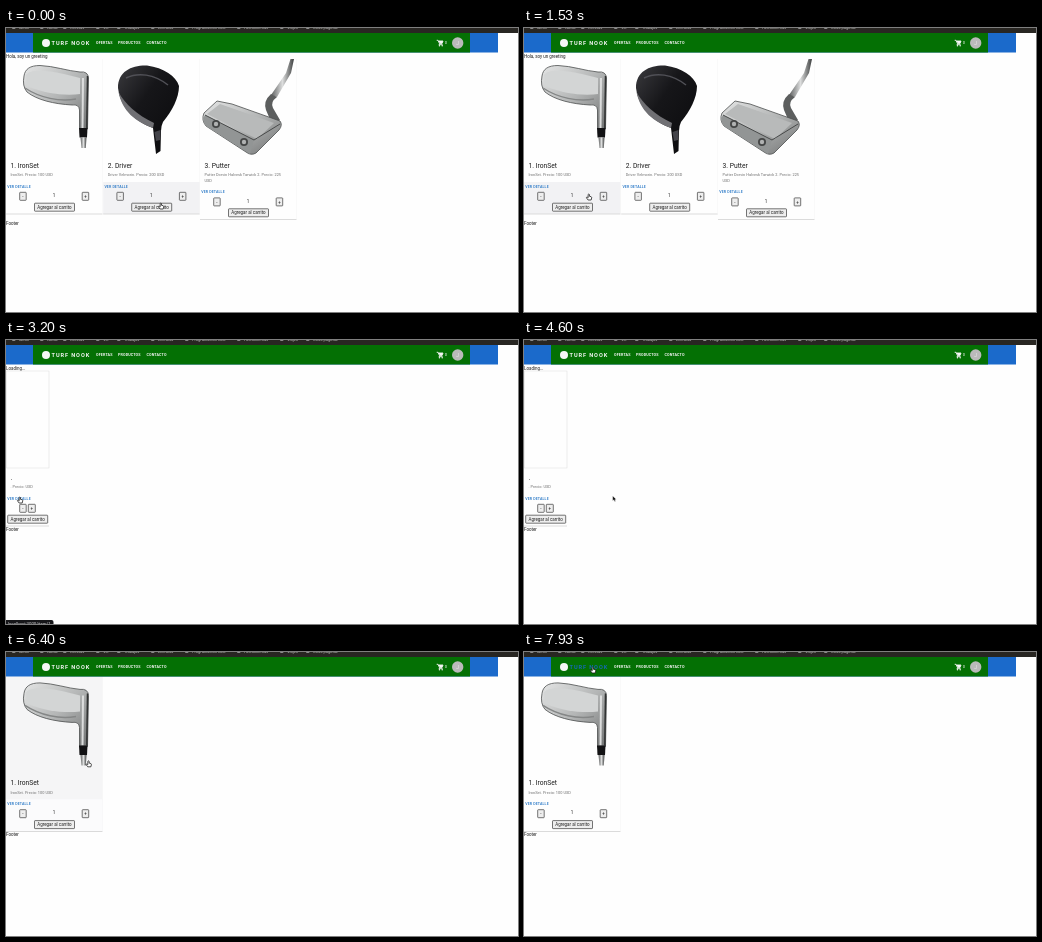
Recreate the animation shown at these times as an HTML page. Size 512 by 284 pixels, loop 8000 ms.

```html
<!DOCTYPE html>
<html lang="es">
<head>
<meta charset="utf-8">
<title>Tienda</title>
<style>
  html, body { margin: 0; width: 100%; height: 100%; overflow: hidden; background: #fefefe; }
  svg { display: block; width: 100%; height: 100%; }
  text { font-family: Roboto, "Liberation Sans", sans-serif; white-space: pre; }
</style>
</head>
<body>
<svg id="stage" viewBox="0 0 512 284">
  <defs>
    <linearGradient id="steel" x1="0" y1="0" x2="1" y2="1">
      <stop offset="0" stop-color="#e4e5e5"/><stop offset=".5" stop-color="#b4b6b6"/><stop offset="1" stop-color="#707272"/>
    </linearGradient>
    <linearGradient id="carbon" x1="0" y1="0" x2="1" y2="1">
      <stop offset="0" stop-color="#3a3a3e"/><stop offset=".4" stop-color="#161619"/><stop offset="1" stop-color="#0a0a0c"/>
    </linearGradient>
    <linearGradient id="rod">
      <stop offset="0" stop-color="#5c5e5e"/><stop offset=".5" stop-color="#dcdddd"/><stop offset="1" stop-color="#3c3e3e"/>
    </linearGradient>

    <g id="iron">
      <path d="M18 48C19 41 24 37.500 34 37.500C48 38 62 43 74 44Q82 43 82.500 50L81.500 101H73.500V82Q73 76 66 77C48 76 31 72 21 64Q16 58 18 48Z" fill="url(#steel)" stroke="#4c4e4e" stroke-width=".8"/>
      <path d="M20 47C24 41 42 42 58 46L74 50V66C60 68 40 66 21 58Z" fill="#d3d5d5"/>
      <path d="M19 60C34 70 54 74 70 71" fill="none" stroke="#858787" stroke-width="1.500"/>
      <path d="M77 50L76.500 100" fill="none" stroke="#dcdddd" stroke-width="2"/>
      <path d="M81.500 48L80.800 100" fill="none" stroke="#303232" stroke-width="1.500"/>
      <path d="M73 100H81.500L81 109.500H73.500Z" fill="#121214"/>
      <path d="M74.500 109.500H80.500L79.800 120H75.500Z" fill="url(#rod)"/>
    </g>

    <g id="driver">
      <path d="M112 60C112 43 126 37 141 37.500C158 40 170 48 173 58C173 70 166 83 157 94Q155 98 155 103L154.500 123L150 126L147 100C131 94 115 82 112 60Z" fill="url(#carbon)"/>
      <path d="M112.500 64C119 76 131 87 148 95L147 100C130 94 116 83 112.500 64Z" fill="#707074"/>
      <path d="M120 50C132 44 148 46 162 57" fill="none" stroke="#505056" stroke-width="1.500"/>
      <path d="M148.500 104L154.500 102L154 112L150 113Z" fill="#44444a"/>
    </g>

    <g id="putter">
      <path d="M284.500 31H288L285 45L271 69L265 67L280 45Z" fill="url(#rod)"/>
      <path d="M265 66L271 69Q264 74 267 80L274 92L266 96L260 82Q257 73 265 66Z" fill="#5c5e5e"/>
      <path d="M198 85L211 73L226 76L274 93Q277 97 273 102L250 125Q245 128 240 124L200 98Q195 92 198 85Z" fill="url(#steel)" stroke="#4c4e4e" stroke-width=".8"/>
      <path d="M214 76L268 95L251 111L201 86Z" fill="#b8baba"/>
      <path d="M199 87L248 112L244 126L200 98Q195 92 199 87Z" fill="#929595"/>
      <path d="M199 87L248 112L274 96" fill="none" stroke="#484a4a"/>
      <circle cx="210" cy="96" r="4" fill="#444646"/><circle cx="238" cy="114" r="4" fill="#444646"/>
      <circle cx="210" cy="96" r="2.200" fill="#b0b2b2"/><circle cx="238" cy="114" r="2.200" fill="#b0b2b2"/>
    </g>
  </defs>
  <rect width="512" height="284" fill="#fefefe"/>
  <g id="home"></g>
  <g id="loading"></g>
  <g id="detail"></g>
  <g id="header"></g>
  <g id="status">
    <path d="M0 280H45.500Q47.500 280 47.500 282V284H0Z" fill="#161619"/>
    <text x="2" y="284.700" font-size="4.300" fill="#d4d4d6">localhost:3000/item/1</text>
  </g>
  <path id="arrow" d="M0 0V4.800L1.200 3.800L2 5.600L2.900 5.200L2.100 3.500H3.600Z" fill="#0a0a0a" stroke="#fff" stroke-width=".3"/>
  <path id="hand" d="M-.8-2.600Q-.1-3.400.5-2.500V-.7L2.200-.3Q2.900 0 2.700 1L2.200 3H-.9L-2.500.8Q-2.500-.1-1.700.1L-.8.800Z" fill="#fff" stroke="#151515" stroke-width=".75" stroke-linejoin="round"/>
</svg>
<script>
const LOOP = 8000;
const TINT = '#f2f2f4', INK = '#1c1c1c', LINK = '#1f72c4', EDGE = '#d2d2d2', PALE = '#f6f6f6';
const $ = id => document.getElementById(id);

const text = (x, y, size, fill, str, extra = '') =>
  `<text x="${x}" y="${y}" font-size="${size}" fill="${fill}" ${extra}>${str}</text>`;
const rect = (x, y, w, h, fill, extra = '') =>
  `<rect x="${x}" y="${y}" width="${w}" height="${h}" fill="${fill}" ${extra}/>`;

function button(x, y, w, label) {
  return rect(x, y, w, 8, '#eeeeee', 'rx=".6" stroke="#3c3c3c" stroke-width=".7"') +
    text(x + w / 2, y + 5.600, 4.480, INK, label, 'text-anchor="middle"');
}

const link = (x, y) =>
  text(x, y, 3.640, LINK, 'VER DETALLE', 'font-weight="500" letter-spacing=".11"');

// Product card; extra lines of description push the controls down
function card(x, art, title, lines, id) {
  const dy = (lines.length - 1) * 5.600;
  const end = 186 + dy;
  return rect(x, 31, 96.500, 123 + dy, TINT, `id="${id}Top" opacity="0"`) +
    rect(x, 154 + dy, 96.500, 32, TINT, `id="${id}Low" opacity="0"`) +
    rect(x, end - .4, 96.500, .8, EDGE) +
    rect(x + 96.300, 31, .4, end - 31, '#f2f2f2') +
    `<use href="#${art}"/>` +
    text(x + 4.500, 139.600, 6.720, INK, title) +
    lines.map((s, i) => text(x + 4.500, 148.400 + i * 5.600, 3.920, '#707070', s)).join('') +
    link(x + 1.200, 159.600 + dy) +
    button(x + 13.700, 164.300 + dy, 6.500, '-') +
    text(x + 48, 169 + dy, 4.480, INK, '1', 'text-anchor="middle"') +
    button(x + 76.200, 164.300 + dy, 6.500, '+') +
    button(x + 28.500, 175.200 + dy, 40, 'Agregar al carrito');
}

const ironCard = id => card(0, 'iron', '1. IronSet', ['IronSet. Precio: 100 USD'], id);

$('home').innerHTML =
  text(0, 29.800, 4.480, INK, 'Hola, soy un greeting') +
  ironCard('one') +
  card(97.200, 'driver', '2. Driver', ['Driver Velmorin. Precio: 200 USD'], 'two') +
  card(194, 'putter', '3. Putter', ['Putter Dorvin Halvesk Tarwick 2. Precio: 225', 'USD'], 'three') +
  text(0, 196.700, 4.480, INK, 'Footer');

$('loading').innerHTML =
  text(0, 29.800, 4.480, INK, 'Loading...') +
  rect(.3, 31, 42.700, 97, 'none', 'stroke="#e0e0e0" stroke-width=".6"') +
  text(4.500, 139.600, 6.720, INK, '.') +
  text(4.500, 148.400, 3.920, '#707070', '. Precio: USD') +
  link(1.200, 159.600) +
  button(13.700, 164.300, 6.500, '-') + button(22.300, 164.300, 7, '+') +
  button(1.700, 175.200, 40, 'Agregar al carrito') +
  rect(0, 185.600, 43, .8, EDGE) +
  text(0, 190.700, 4.480, INK, 'Footer');

$('detail').innerHTML = `<g transform="translate(0 -6.600)">${ironCard('item')}</g>` +
  text(0, 184, 4.480, INK, 'Footer');

// Bookmark strip, cut off by the top of the stage
const marks = [[13, 'Ideas'], [41, 'Notas'], [64, 'Recetas'], [97, 'Ver'], [118, 'Trabajos'], [152, 'Lecturas'],
  [186, 'Programación web'], [238, 'Herramientas'], [281, 'Viajes'], [307, 'Otras páginas']];

const nav = 'font-weight="700" letter-spacing=".12"';
$('header').innerHTML =
  rect(0, 0, 512, 5, '#282622') +
  marks.map(([x, s]) => rect(x - 7, -1.500, 3.500, 2.500, '#8c8c8c', 'rx="1"') +
    text(x, .8, 4, '#c6c6c6', s)).join('') +
  rect(0, 5, 492, 19.500, '#1b6acb') +
  rect(27, 5, 437, 19.500, '#047004') +
  `<circle cx="40" cy="15" r="4" fill="${PALE}"/>` +
  text(45.600, 17, 5.600, PALE, 'TURF NOOK', 'id="brand" font-weight="700" letter-spacing=".9"') +
  text(90, 16.200, 3.700, PALE, 'OFERTAS', nav) +
  text(112, 16.200, 3.700, PALE, 'PRODUCTOS', nav) +
  text(140.500, 16.200, 3.700, PALE, 'CONTACTO', nav) +
  `<path d="M430.700 12.300H432L433.500 15.700H436L437 13H432.400M433.500 15.700L433 16.700H436.700" fill="none" stroke="${PALE}" stroke-width=".9"/>` +
  `<path d="M432.700 13H437L435.900 15.600H433.700Z" fill="${PALE}"/>` +
  `<circle cx="433.400" cy="17.700" r=".7" fill="${PALE}"/><circle cx="436.200" cy="17.700" r=".7" fill="${PALE}"/>` +
  text(438.700, 16.400, 4, PALE, '0') +
  '<circle cx="451.700" cy="15" r="5.700" fill="#bababa"/>' +
  text(451.700, 16.800, 5, '#ececec', 'J', 'text-anchor="middle"');

// Pointer stops: time, x, y
const path = [[0, 155, 178], [300, 153, 178], [870, 112, 174], [1530, 65, 169], [2350, 20, 159], [2800, 14, 160],
  [4000, 14, 160], [4600, 89, 158], [6070, 89, 158], [6670, 78, 78], [7070, 78, 78], [7870, 69, 18], [LOOP, 69, 18]];

const clamp = v => Math.max(0, Math.min(1, v));
const smooth = v => v * v * (3 - 2 * v);

function pointer(t) {
  const i = Math.max(1, path.findIndex(p => p[0] > t));
  const [t0, x0, y0] = path[i - 1], [t1, x1, y1] = path[i];
  const raw = (t - t0) / (t1 - t0);
  const k = t < 2350 ? raw : smooth(raw);
  return [x0 + (x1 - x0) * k, y0 + (y1 - y0) * k];
}

const show = (id, on) => $(id).setAttribute('visibility', on ? 'visible' : 'hidden');
const fade = (id, t, from, to) =>
  $(id).setAttribute('opacity', clamp((t - from) / 200) * (1 - clamp((t - to) / 200)));

function draw(t) {
  show('home', t < 2900);
  show('loading', t >= 2900 && t < 5070);
  show('detail', t >= 5070);
  show('status', t >= 2200 && t < 4270);

  fade('twoLow', t, -300, 1030);
  fade('oneLow', t, 1080, 2900);
  fade('itemLow', t, 5070, 6260);
  fade('itemTop', t, 6260, 7620);
  $('brand').setAttribute('fill', t > 7700 ? '#1668b4' : PALE);

  const [x, y] = pointer(t);
  const isArrow = t >= 4200 && t < 5070;
  show('arrow', isArrow);
  show('hand', !isArrow);
  $('arrow').setAttribute('transform', `translate(${x - .3} ${y - 2})`);
  $('hand').setAttribute('transform', `translate(${x} ${y})`);
}

function tick() {
  draw(performance.now() % LOOP);
  requestAnimationFrame(tick);
}
tick();
</script>
</body>
</html>
```
